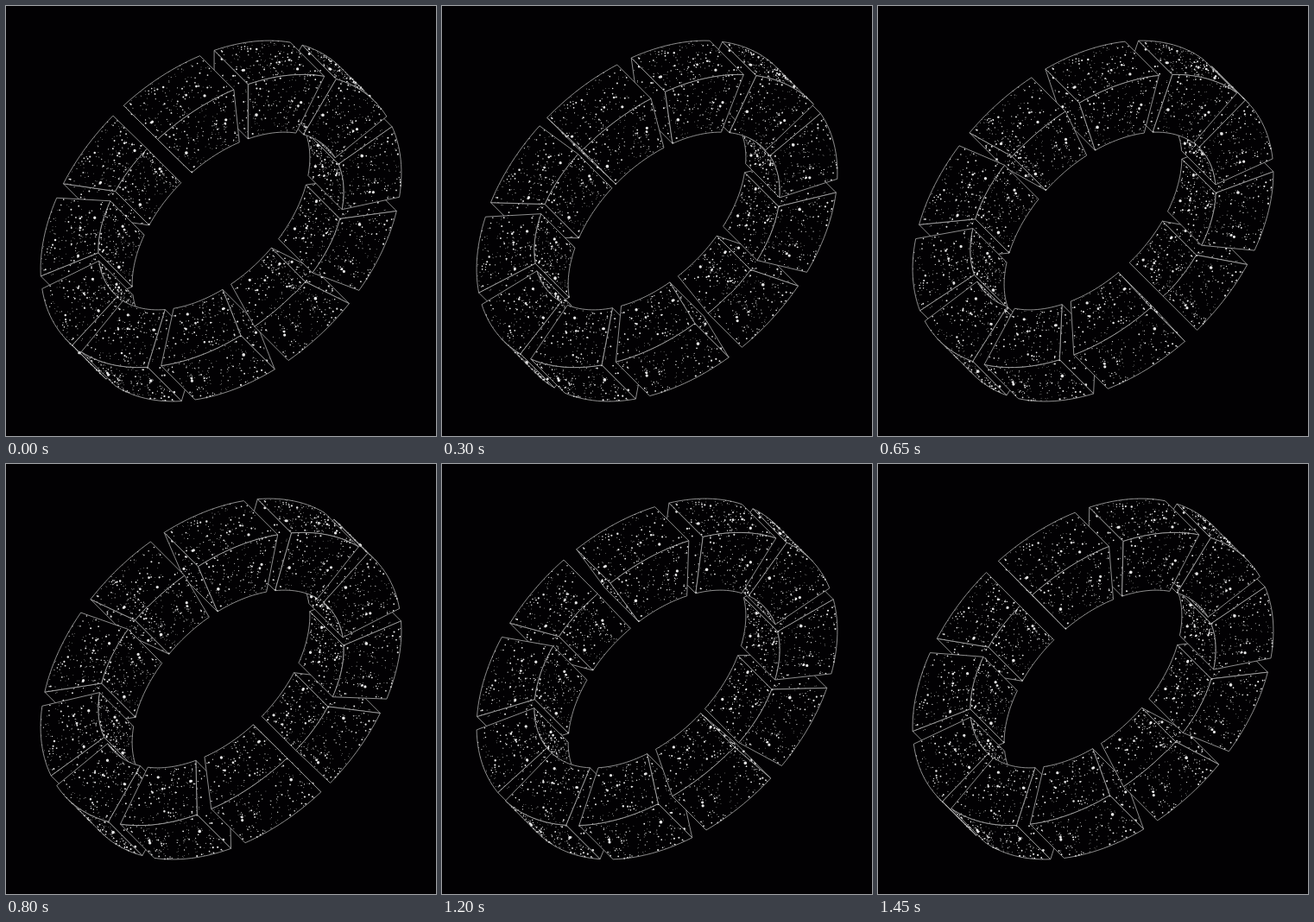
Animation, 498 px wide and 498 px high, one loop 1.5 s. Source, as an HTML page with a canvas:

```html
<!DOCTYPE html>
<html lang="en">
<head>
<meta charset="utf-8">
<title>Impossible ring</title>
<style>
  html, body { margin: 0; width: 100%; height: 100%; overflow: hidden; background: #020103; }
  canvas { display: block; width: 498px; height: 498px; }
</style>
</head>
<body>
<canvas id="stage" width="498" height="498"></canvas>
<script>
const ctx = document.getElementById('stage').getContext('2d');
const BG = '#020103', LINE = '#b0b0b0', DOT = '#e6e6e6';
const LOOP = 1500, STEP = 50;
const DEG = Math.PI / 180, HALF = Math.PI / 2;
const BLOCKS = 11, PITCH = 2 * Math.PI / BLOCKS, SPAN = 27.8 * DEG, START = 3.8 * DEG;
const CENTER = 249, SHIFT = 27.8;
const INNER = { a: 147, b: 91.8 }, OUTER = { a: 223.8, b: 146.8 };

// Cross-section corners as [radius, depth]; face f lies between corners f and f + 1:
// 0 outer wall, 1 front, 2 inner wall.
const CORNERS = [[1, 0], [1, 1], [0, 1], [0, 0]];

const mix = (a, b, k) => a + (b - a) * k;

// Blocks run ahead along each half and ease into the splice at either end.
function slide(t, r, half) {
  const start = Math.round((t - HALF) / Math.PI - half) % 2 ? 0 : 0;
  const turn = Math.PI * (2 * Math.round((t - half * Math.PI - HALF) / (2 * Math.PI)) + half) + start;
  const x = t - turn;
  const lead = 1.5 * DEG * (1 - Math.cos(x));
  const entry = (1 - r) * Math.min(0.6 * x, 2.4 * DEG * Math.cos(x) ** 6);
  return turn + Math.min(x + lead + entry, Math.PI - (Math.PI - x) / 2);
}

// The two halves of the ring are seen from opposite sides, so the depth flips.
function project(t, r, d, half) {
  const depth = (2 * d - 1) * SHIFT * (half ? -1 : 1);
  const angle = slide(t, r, half);
  const u = mix(INNER.a, OUTER.a, r) * Math.sin(angle);
  const w = depth - mix(INNER.b, OUTER.b, r) * Math.cos(angle);
  return [CENTER + (u + w) * Math.SQRT1_2, CENTER + (w - u) * Math.SQRT1_2];
}

const corner = (t, c, half) => project(t, CORNERS[c][0], CORNERS[c][1], half);

function onFace(t, f, v, half) {
  const [p, q] = [CORNERS[f], CORNERS[f + 1]];
  return project(t, mix(p[0], q[0], v), mix(p[1], q[1], v), half);
}

function random(seed) {
  return () => {
    seed = (seed + 0x6D2B79F5) | 0;
    let x = Math.imul(seed ^ (seed >>> 15), 1 | seed);
    x = (x + Math.imul(x ^ (x >>> 7), 61 | x)) ^ x;
    return ((x ^ (x >>> 14)) >>> 0) / 4294967296;
  };
}

function speckle(seed, count) {
  const rnd = random(seed);
  return Array.from({ length: count }, () => ({
    k: rnd(), v: rnd(), size: 0.38 + 0.6 * rnd() ** 3 + 1.1 * rnd() ** 16
  }));
}

const skins = [speckle(11, 175), speckle(47, 175)];
const endSkin = speckle(83, 55);

function trace(points) {
  points.forEach(([x, y], i) => i ? ctx.lineTo(x, y) : ctx.moveTo(x, y));
}

function fill(points) {
  ctx.beginPath();
  trace(points);
  ctx.closePath();
  ctx.fillStyle = BG;
  ctx.fill();
}

function stroke(points, closed) {
  ctx.beginPath();
  trace(points);
  if (closed) ctx.closePath();
  ctx.stroke();
}

function arc(from, to, c, half) {
  const n = Math.max(2, Math.ceil((to - from) / (2 * DEG)));
  return Array.from({ length: n + 1 }, (_, i) => corner(mix(from, to, i / n), c, half));
}

function dots(skin, place) {
  ctx.beginPath();
  for (const dot of skin) {
    const p = place(dot);
    if (!p) continue;
    ctx.moveTo(p[0] + dot.size, p[1]);
    ctx.arc(p[0], p[1], dot.size, 0, 2 * Math.PI);
  }
  ctx.fillStyle = DOT;
  ctx.fill();
}

function drawEnd(t) {
  const half = Math.floor(t / Math.PI) & 1;
  const quad = CORNERS.map((_, c) => corner(t, c, half));
  fill(quad);
  dots(endSkin, ({ k, v }) => project(t, k, v, half));
  stroke(quad, true);
}

function drawFace(f, from, to, t0, half) {
  const first = arc(from, to, f, half), second = arc(from, to, f + 1, half);
  fill([...first, ...second.slice().reverse()]);
  dots(skins[(f + half) % 2], ({ k, v }) => {
    const t = t0 + k * SPAN;
    return t >= from && t < to ? onFace(t, f, v, half) : null;
  });
  stroke(first);
  stroke(second);
  const edge = t => stroke([corner(t, f, half), corner(t, f + 1, half)]);
  if (from === t0) edge(from);
  if (to === t0 + SPAN || f === 0) edge(to);
}

function drawBody(t0) {
  const t1 = t0 + SPAN;
  for (let q = Math.floor(t1 / HALF); q >= Math.floor(t0 / HALF); q--) {
    const from = Math.max(t0, q * HALF), to = Math.min(t1, (q + 1) * HALF);
    if (to - from < 1e-6) continue;
    const half = (q >> 1) & 1;
    for (const f of q & 1 ? [2, 1] : [0, 1]) drawFace(f, from, to, t0, half);
  }
}

function draw(time) {
  const progress = Math.floor((time % LOOP) / STEP) * STEP / LOOP;
  const base = START - progress * PITCH;
  ctx.fillStyle = BG;
  ctx.fillRect(0, 0, 498, 498);
  ctx.strokeStyle = LINE;
  ctx.lineWidth = 0.8;
  ctx.lineJoin = 'round';
  for (let i = 0; i < BLOCKS; i++) drawEnd(base + i * PITCH);
  for (let i = BLOCKS - 1; i >= 0; i--) drawBody(base + i * PITCH);
}

const began = performance.now();
function tick() {
  draw(performance.now() - began);
  requestAnimationFrame(tick);
}
tick();
</script>
</body>
</html>
```
